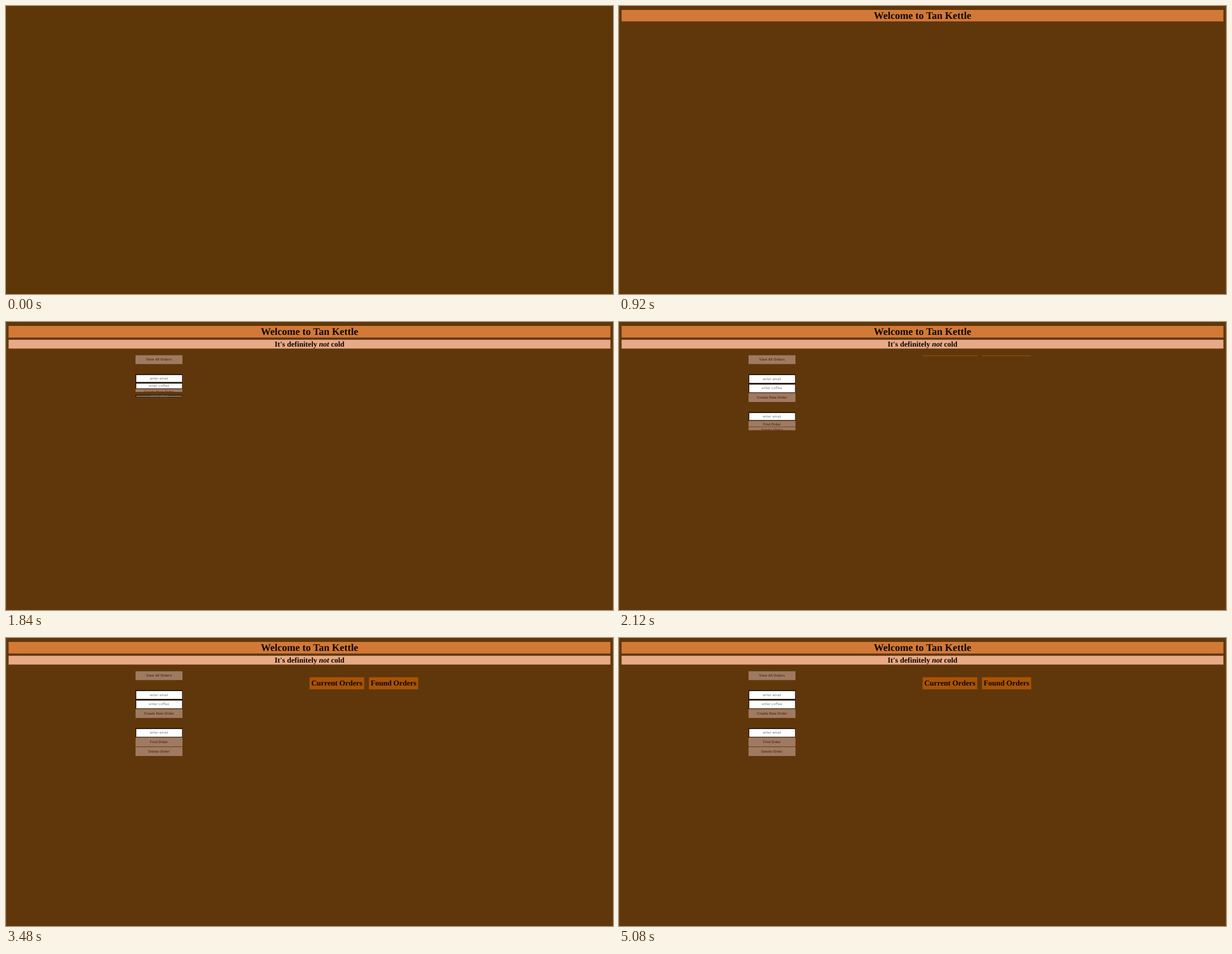
These frames come from a looping animation (1087 by 515 pixels, 5200 ms). An HTML page:

```html
<!DOCTYPE html>
<html lang="en">
<head>
<meta charset="utf-8">
<title>Coffee orders</title>
<style>
  html, body { margin: 0; width: 100%; height: 100%; overflow: hidden; background: #60370a; }
  #stage { display: block; width: 1087px; height: 515px; }
  #stage svg { overflow: hidden; }
  text { text-anchor: middle; text-rendering: geometricPrecision; white-space: pre; }
  .serif { font-family: "Liberation Serif", Times, serif; font-weight: 700; fill: #0b0503; }
  .ui { font: 500 6.05px Inter, sans-serif; letter-spacing: .12px; fill: #47250f; }
  .hint { font-weight: 400; fill: #757575; }
</style>
</head>
<body>
<svg id="stage" viewBox="0 0 1087 515" xmlns="http://www.w3.org/2000/svg"></svg>
<script>
const LOOP = 5200, LOADED = 600;
const NS = "http://www.w3.org/2000/svg";
const stage = document.getElementById("stage");

function add(parent, tag, attrs, text) {
  const el = document.createElementNS(NS, tag);
  for (const key in attrs) el.setAttribute(key, attrs[key]);
  if (text) el.textContent = text;
  return parent.appendChild(el);
}

const page = add(stage, "rect", { width: 1087, height: 515 });
const edges = add(stage, "g", { fill: "#754a24" });
add(edges, "rect", { width: .8, height: 515 });
add(edges, "rect", { x: 1086.4, width: .6, height: 515 });

// A block clips its contents while it slides open.
function block(x, width, fill) {
  const box = add(stage, "svg", { x, width, height: 0 });
  add(box, "rect", { width, height: 40, fill });
  return box;
}

function label(box, text, size) {
  const x = box.getAttribute("width") / 2;
  const attrs = size ? { x, class: "serif", "font-size": size } : { x, class: "ui" };
  return add(box, "text", attrs, text);
}

function place(box, y, height) {
  box.setAttribute("y", y);
  box.setAttribute("height", Math.max(0, height));
}

// Swing easing, 0 to 1.
function swing(time, start, duration) {
  const t = Math.min(1, Math.max(0, (time - start) / duration));
  return .5 - Math.cos(Math.PI * t) / 2;
}

const title = block(4.4, 1078.2, "#d27937");
label(title, "Welcome to Tan Kettle", 18).setAttribute("y", 16.1);

const tagline = block(4.4, 1078.2, "#e8aa86");
const tagText = label(tagline, "It's definitely ", 13.5);
tagText.setAttribute("y", 12.1);
add(tagText, "tspan", { "font-style": "italic" }, "not");
add(tagText, "tspan", {}, " cold");

const FORM_X = 231.9, FORM_W = 84.1;
const controls = [
  ["button", "View All Orders", 18],
  ["input", "enter email", .5],
  ["input", "enter coffee", .5],
  ["button", "Create New Order", 18],
  ["input", "enter email", .5],
  ["button", "Find Order", 1],
  ["button", "Delete Order", 0]
].map(([kind, name, gap], i) => {
  const isInput = kind === "input";
  const box = block(FORM_X, FORM_W, isInput ? "#0a0401" : "#9f7a61");
  const inner = isInput && add(box, "rect", { x: 1.3, y: 1.6, width: FORM_W - 2, fill: "#fff" });
  const text = label(box, name);
  if (isInput) text.classList.add("hint");
  return { box, inner, text, gap, start: 1400 + 90 * i };
});

const headings = [
  [543.4, 98.3, "Current Orders"],
  [649.8, 88.5, "Found Orders"]
].map(([x, width, name]) => {
  const box = block(x, width, "#a95304");
  return { box, text: label(box, name, 13.5) };
});

function drawForm(time) {
  let y = 59.3;
  for (const { box, inner, text, gap, start } of controls) {
    const p = swing(time, start, 450);
    let height = 16 * p;
    if (inner) {
      height = p > 0 ? 2.2 + 14.2 * p : 0;
      inner.setAttribute("height", Math.max(0, height - 2.4));
      text.setAttribute("y", height / 2 + 2.1);
    } else {
      text.setAttribute("y", 5.7 + 4.5 * p);
    }
    place(box, y, height);
    y += height + gap * p;
  }
}

function draw(time) {
  const loaded = time >= LOADED;
  page.setAttribute("fill", loaded ? "#60370a" : "#5e3708");
  edges.setAttribute("visibility", loaded ? "visible" : "hidden");

  const a = loaded ? swing(time, 540, 400) : 0;
  place(title, 4.4 + 2.6 * a, 20.7 * a);

  const b = swing(time, 955, 420);
  place(tagline, 27.9 + 3.6 * b, 16 * b);

  drawForm(time);

  const c = swing(time, 2050, 450);
  for (const { box, text } of headings) {
    text.setAttribute("y", 12.1 + 3.1 * c);
    place(box, 58.9 + 11.2 * c, 21.6 * c);
  }
}

const begin = performance.now();
function tick() {
  draw((performance.now() - begin) % LOOP);
  requestAnimationFrame(tick);
}
tick();
</script>
</body>
</html>
```
